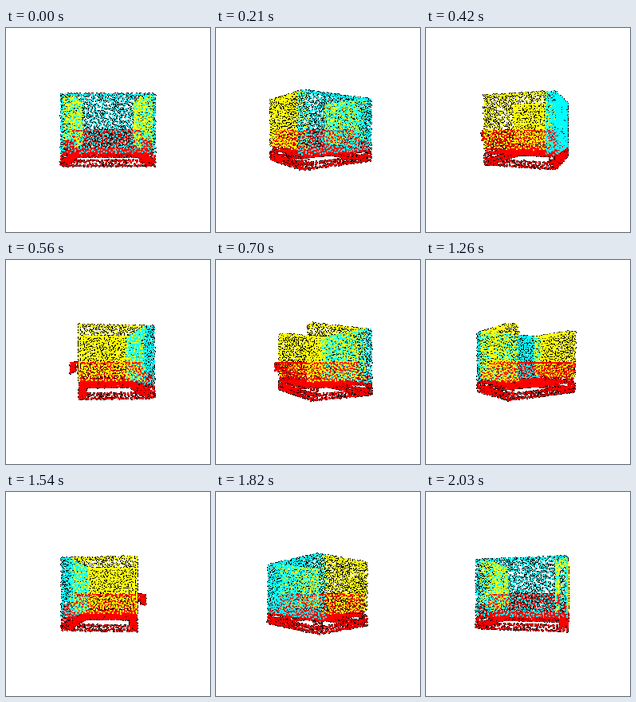
Animation of 256 by 256 pixels, one loop 2100 ms. Source, as a matplotlib script:

```python
import numpy as np
import matplotlib.pyplot as plt
from matplotlib.animation import FuncAnimation
from matplotlib.colors import to_rgba

SIZE, DPI = 256, 100
FRAMES, STEP_MS = 30, 70
CAM, FOCAL = 251.0, 248.0
GAP = 2.8            # least distance between two dots on a surface

RED, YELLOW, CYAN = "#ff0000", "#ffff00", "#00ffff"
rng = np.random.default_rng(7)


def box_dots(x, y, z, skip=""):
    """Evenly scattered dots on a box surface; skip names faces left open."""
    lo, hi = np.array([x, y, z], float).T
    span = hi - lo
    kept = np.empty((0, 3))
    for axis, name in enumerate("xyz"):
        area = np.delete(span, axis).prod()
        for side, level in (("-", lo[axis]), ("+", hi[axis])):
            if side + name in skip.split():
                continue
            darts = lo + rng.random((int(area * 0.9) + 8, 3)) * span
            darts[:, axis] = level
            face = np.empty((len(kept) + len(darts), 3))
            n = len(kept)
            face[:n] = kept
            for p in darts:
                if n == 0 or ((face[:n] - p) ** 2).sum(1).min() > GAP ** 2:
                    face[n] = p
                    n += 1
            kept = face[:n]
    return kept


def build_chair():
    ends = ((-34.5, -28), (37.5, 44))
    parts = [
        (CYAN, box_dots((-49.4, 49.4), (-24, 38), (34, 44), "-y")),
        (RED, box_dots((-39, 39), (-12, -1), (-44, 34), "-y")),
        (RED, box_dots((-47, 47), (-26, -12), (-34, 42), "+y")),
    ]
    for s in (-1, 1):
        arm = sorted((s * 37, s * 49.4))
        bar = sorted((s * 42.5, s * 49.4))
        parts.append((YELLOW, box_dots(arm, (-20, 38), (-34.5, 34), "-y +z")))
        parts.append((RED, box_dots(bar, (-38, -32.5), (-34.5, 44))))
        for z in ends:
            parts.append((RED, box_dots(bar, (-32.5, -26), z, "-y +y")))
    for z in ends:
        parts.append((RED, box_dots((-42.5, 42.5), (-38, -32.5), z, "-x +x")))
    dots = np.vstack([p for _, p in parts])
    tints = np.vstack([np.tile(to_rgba(c), (len(p), 1)) for c, p in parts])
    return dots, tints


def project(angle):
    """Screen positions and draw order, far to near, after turning the chair."""
    x, y, z = dots.T
    c, s = np.cos(angle), np.sin(angle)
    depth = z * c - x * s
    scale = FOCAL / (CAM - depth)
    spots = np.column_stack([128 + (x * c + z * s) * scale, 128 - y * scale])
    return spots, np.argsort(depth)


def area(px):
    return (px * 72 / DPI) ** 2


dots, tints = build_chair()

fig = plt.figure(figsize=(SIZE / DPI, SIZE / DPI), dpi=DPI, facecolor="white")
ax = fig.add_axes([0, 0, 1, 1])
ax.set(xlim=(0, SIZE), ylim=(SIZE, 0))
ax.axis("off")

# Without antialiasing every touched pixel is filled, so the discs are small.
style = dict(marker="o", linewidths=0, antialiased=False)
start = project(0)[0]
rims = ax.scatter(*start.T, s=area(1.9), c=["black"] * len(dots), zorder=1, **style)
cores = ax.scatter(*start.T, s=area(1.0), c=tints, zorder=2, **style)


def update(i):
    spots, order = project(2 * np.pi * i / FRAMES)
    rims.set_offsets(spots)
    cores.set_offsets(spots[order])
    cores.set_facecolors(tints[order])
    return rims, cores


anim = FuncAnimation(fig, update, frames=FRAMES, interval=STEP_MS,
                     repeat=True, repeat_delay=0)
plt.show()
```
